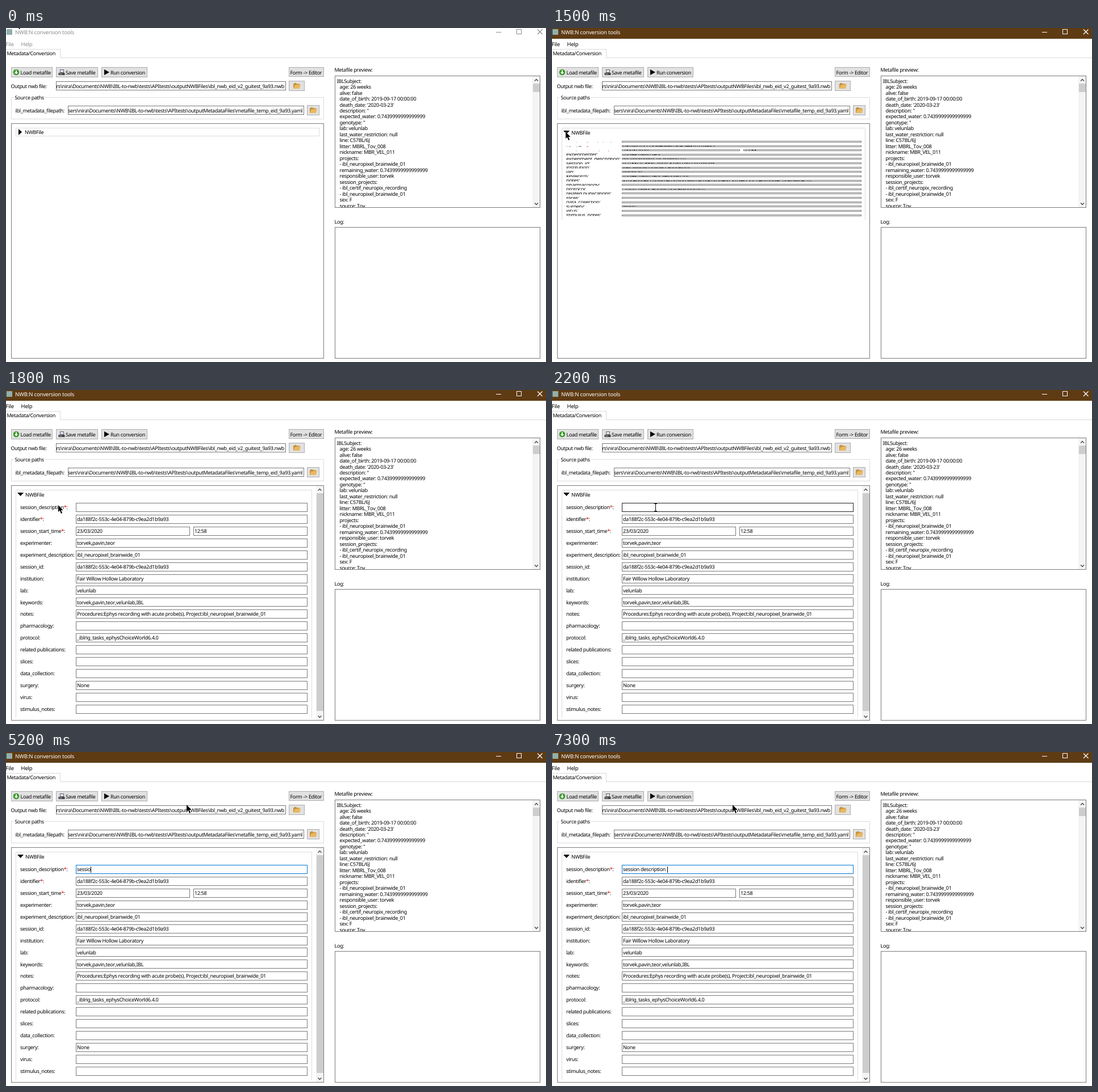
Animation of 951 by 589 pixels, one loop 8 s. Source, as an HTML page with a canvas:

```html
<!DOCTYPE html>
<html lang="en">
<head>
<meta charset="utf-8">
<title>Conversion tools</title>
<style>
html, body { margin: 0; width: 100%; height: 100%; overflow: hidden; background: #fff; }
canvas { display: block; }
</style>
</head>
<body>
<canvas id="stage" width="951" height="589"></canvas>
<script>
const ctx = document.getElementById('stage').getContext('2d');
const LOOP = 8000, STEP = 100;
const ACTIVE = 1300, OPENING = 1400, OPEN = 1800, HOVER = 2200, FOCUS = 2300;
const BORDER = '#7a7a7a', PALE = '#dcdcdc', BLUE = '#0078d7';

const NWB_PATH = 'C:\\Users\\nira\\Documents\\NWB\\IBL-to-nwb\\tests\\APItests\\';
const ID = 'da188f2c-553c-4e04-879b-c9ea2d1b9a93';
const ROWS = [
  ['session_description', ''], ['identifier', ID], ['session_start_time', '23/03/2020', '12:58'],
  ['experimenter', 'torvek,pavin,teor'], ['experiment_description', 'ibl_neuropixel_brainwide_01'],
  ['session_id', ID], ['institution', 'Fair Willow Hollow Laboratory'], ['lab', 'velunlab'],
  ['keywords', 'torvek,pavin,teor,velunlab,IBL'],
  ['notes', 'Procedures:Ephys recording with acute probe(s), Project:ibl_neuropixel_brainwide_01'],
  ['pharmacology', ''], ['protocol', '_iblrig_tasks_ephysChoiceWorld6.4.0'],
  ['related publications', ''], ['slices', ''], ['data_collection', ''],
  ['surgery', 'None'], ['virus', ''], ['stimulus_notes', '']
];
const PREVIEW = `IBLSubject:
age: 26 weeks
alive: false
date_of_birth: 2019-09-17 00:00:00
death_date: '2020-03-23'
description: ''
expected_water: 0.7439999999999999
genotype: ''
lab: velunlab
last_water_restriction: null
line: C57BL/6J
litter: MBRL_Tov_008
nickname: MBR_VEL_011
projects:
- ibl_neuropixel_brainwide_01
remaining_water: 0.7439999999999999
responsible_user: torvek
session_projects:
- ibl_certif_neuropix_recording
- ibl_neuropixel_brainwide_01
sex: F
source: Tov`.split('\n');

const TYPED = 'session description ';
const KEY_TIMES = [3900, 4600, 4800, 5000, 5200, 5200, 5300, 5400, 5600, 5800,
  6000, 6300, 6500, 6700, 6800, 7000, 7000, 7100, 7200, 7300];

// Pointer path: time, x, y
const PATH = [[100, 18, -13], [200, 10, 4], [600, 72, 80], [1000, 30, 180], [1100, 24, 183],
  [1500, 24, 183], [1700, 69, 202], [2200, 182, 207], [2300, 200, 213], [2400, 200, 213],
  [2500, 215, 228], [2700, 262, 139], [2800, 262, 139], [2900, 292, 112], [3000, 318, 93]];

function setFont(size, spacing) {
  ctx.font = `${size}px "Noto Sans", "Open Sans", sans-serif`;
  ctx.letterSpacing = spacing + 'px';
}

function text(str, x, y, color = '#000', align = 'left') {
  ctx.fillStyle = color;
  ctx.textAlign = align;
  ctx.fillText(str, x, y);
}

function fill(x, y, w, h, color) {
  ctx.fillStyle = color;
  ctx.fillRect(x, y, w, h);
}

function box(x, y, w, h, stroke = BORDER, color = '#fff') {
  fill(x, y, w, h, color);
  ctx.strokeStyle = stroke;
  ctx.lineWidth = 1;
  ctx.strokeRect(x + .5, y + .5, w - 1, h - 1);
}

function line(points, color, width = 1) {
  ctx.beginPath();
  points.forEach(p => ctx.lineTo(...p));
  ctx.strokeStyle = color;
  ctx.lineWidth = width;
  ctx.stroke();
}

function poly(points, color = '#000') {
  ctx.beginPath();
  points.forEach(p => ctx.lineTo(...p));
  ctx.fillStyle = color;
  ctx.fill();
}

function clipped(x, y, w, h, draw) {
  ctx.save();
  ctx.beginPath();
  ctx.rect(x, y, w, h);
  ctx.clip();
  draw();
  ctx.restore();
}

function chevron(x, y, dir) {
  line([[x - 3, y + dir * 1.5], [x, y - dir * 1.5], [x + 3, y + dir * 1.5]], '#444', 1.3);
}

function titleBar(active) {
  const ink = active ? '#fff' : '#8c8c8c';
  if (active) fill(0, 0, 951, 19, '#5f3b14');
  fill(1, 2, 10, 10, '#8fb0ad');
  setFont(9.5, -.16);
  text('NWB:N conversion tools', 16, 10.5, ink);
  const menu = active ? '#000' : '#8c8c8c';
  text('File', -.5, 31.5, menu);
  text('Help', 26.5, 31.5, menu);
  line([[863, 7.5], [872, 7.5]], ink);
  ctx.strokeRect(899.5, 2.5, 8, 8);
  line([[936, 2.5], [944.5, 11]], ink, 1.2);
  line([[944.5, 2.5], [936, 11]], ink, 1.2);
}

function button(x, y, w, h, label, textX) {
  box(x, y, w, h, '#adadad', '#e1e1e1');
  if (label) text(label, textX, y + 13);
}

function folder(x, y) {
  poly([[x, y + 2], [x + 2, y], [x + 5, y], [x + 6, y + 1.5], [x + 11, y + 1.5], [x + 11, y + 10], [x, y + 10]], '#c98f35');
  poly([[x + 2.5, y + 3.5], [x + 13, y + 2.5], [x + 11, y + 10], [x, y + 10]], '#e8b963');
}

function pathField(x, y, w, path) {
  box(x, y, w, 16);
  clipped(x + 1, y, w - 2, 16, () => text(path, x + w - 3, y + 11.5, '#000', 'right'));
}

function toolbar() {
  line([[0, 37.5], [95.5, 37.5], [95.5, 52.5], [951, 52.5]], '#d9d9d9');
  text('Metadata/Conversion', 1.5, 48);
  button(9, 69, 73, 18, 'Load metafile', 25.5);
  button(88, 69, 74, 18, 'Save metafile', 105);
  button(168, 69, 81, 18, 'Run conversion', 184);
  button(498, 69, 62, 17, 'Form -> Editor', 500.5);

  ctx.beginPath();
  ctx.arc(18, 78, 5.3, 0, 7);
  ctx.fillStyle = '#3b9a2c';
  ctx.fill();
  fill(17, 74.5, 2, 4, '#fff');
  poly([[14.8, 78], [21.2, 78], [18, 81.5]], '#fff');

  fill(95, 73, 7, 6, '#667');
  fill(96, 74, 5, 4, '#dde4ea');
  fill(92.5, 79, 11, 4, '#444');
  fill(94, 80.5, 5, 1, '#bbb');
  poly([[173, 73], [182, 78], [173, 83]]);
}

function sources() {
  text('Output nwb file:', 8.5, 106);
  pathField(88, 94, 405, NWB_PATH + 'outputNWBFiles\\ibl_nwb_eid_v2_guitest_9a93.nwb');
  button(498, 93, 28, 18);
  folder(506, 97);

  box(9, 122, 551, 39, PALE);
  fill(13, 118, 56, 9, '#fff');
  text('Source paths', 15.5, 126);
  text('ibl_metadata_filepath:', 16.5, 148.5);
  pathField(109, 137, 416, NWB_PATH + 'outputMetadataFiles\\metafile_temp_eid_9a93.yaml');
  button(530, 136, 22, 18);
  folder(535, 140);
}

function sidePanels() {
  text('Metafile preview:', 578.5, 77);
  box(579, 84, 362, 233);
  clipped(580, 85, 347, 231, () => PREVIEW.forEach((s, i) =>
    text(s, i ? 587.5 : 582.5, 96.6 + i * 10.476)));
  fill(927, 85, 13, 231, '#f4f4f4');
  fill(928, 98, 12, 15, '#cdcdcd');
  chevron(934, 92, 1);
  chevron(934, 310, -1);
  text('Log:', 578.5, 344.5);
  box(579, 351, 362, 232);
}

function caretAndTyping(t, y) {
  const typed = TYPED.slice(0, KEY_TIMES.filter(k => k <= t).length);
  text(typed, 125, y + 3.2);
  if ((t >= FOCUS && t < 2900) || t >= 3400)
    fill(Math.round(125.5 + ctx.measureText(typed).width), 202, 1, 11, '#000');
}

function formRow([label, value, second], i, t, pitch, right) {
  const h = Math.max(1.5, pitch - 5), y = 199 + i * pitch, mid = y + h / 2;
  const top = Math.round(y), height = Math.max(2, Math.round(h)), required = i < 3;
  const field = (x, w, str) => {
    const stroke = i || t < HOVER ? BORDER : t < FOCUS ? '#222' : BLUE;
    box(x, top, w, height, stroke);
    clipped(x + 1, top + 1, w - 2, height - 2, () => text(str, x + 2, mid + 3.2));
  };
  clipped(18, y - .5, 104, h + 1, () => {
    // Required labels keep their top edge when squeezed; the others stay centred.
    const base = required ? Math.max(mid + 3.2, y + 8.8) : mid + 3.2;
    text(label, 25, base);
    let x = 25 + ctx.measureText(label).width;
    if (required) {
      text('*', x, base, '#e00000');
      x += ctx.measureText('*').width;
    }
    text(':', x, base);
  });
  if (second) {
    const w = Math.floor((right - 128) / 2);
    field(123, w, value);
    field(right - w, w, second);
  } else field(123, right - 123, value);
  if (!i) caretAndTyping(t, mid);
}

function form(t) {
  box(9, 168, 551, 415);
  if (t < ACTIVE) {
    box(17, 176, 535, 15, PALE);
    poly([[22, 178], [28, 183.5], [22, 189]]);
    text('NWBFile', 33, 187.2);
    return;
  }
  const full = t >= OPEN;
  const bottom = full ? 578 : t < OPENING ? 191 : 338 + (t - 1500) * .87;
  const pitch = full ? 20.92 : (bottom - 200.5) / 18.05;
  const edge = full ? 538.5 : 551.5;
  line([[17.5, bottom], [17.5, 176.5], [edge, 176.5], [edge, bottom]], PALE);
  poly([[20, 181], [31, 181], [25.5, 187]]);
  text('NWBFile', 34, 188);
  if (t >= OPENING) ROWS.forEach((row, i) => formRow(row, i, t, pitch, full ? 531 : 545));
  if (full) {
    fill(546, 169, 13, 413, '#f4f4f4');
    fill(547, 182, 12, 384, '#cdcdcd');
    chevron(552.5, 176, 1);
    chevron(552.5, 576, -1);
  }
}

function pointerAt(t) {
  const n = PATH.findIndex(p => p[0] > t);
  if (n < 0) return PATH[PATH.length - 1].slice(1);
  if (!n) return PATH[0].slice(1);
  const [t0, x0, y0] = PATH[n - 1], [t1, x1, y1] = PATH[n], k = (t - t0) / (t1 - t0);
  return [x0 + (x1 - x0) * k, y0 + (y1 - y0) * k];
}

function pointer(t) {
  const [x, y] = pointerAt(t).map(Math.round);
  ctx.save();
  ctx.translate(x, y);
  if (x > 123 && t < 2900) {
    line([[.5, -6], [.5, 6]], '#000');
    line([[-2, -6.5], [3, -6.5]], '#000');
    line([[-2, 6.5], [3, 6.5]], '#000');
  } else {
    const arrow = [[0, 0], [0, 12], [2.8, 9.5], [5, 15], [7, 14], [4.8, 9], [8.5, 9]];
    line([...arrow, arrow[0]], '#fff', 1);
    poly(arrow);
  }
  ctx.restore();
}

function draw(now) {
  const t = Math.floor(now % LOOP / STEP) * STEP;
  ctx.textRendering = 'geometricPrecision';
  ctx.fontKerning = 'none';
  fill(0, 0, 951, 589, '#fff');
  titleBar(t >= ACTIVE);
  setFont(9, -.32);
  toolbar();
  sources();
  sidePanels();
  form(t);
  pointer(t);
  requestAnimationFrame(draw);
}
requestAnimationFrame(draw);
</script>
</body>
</html>
```
